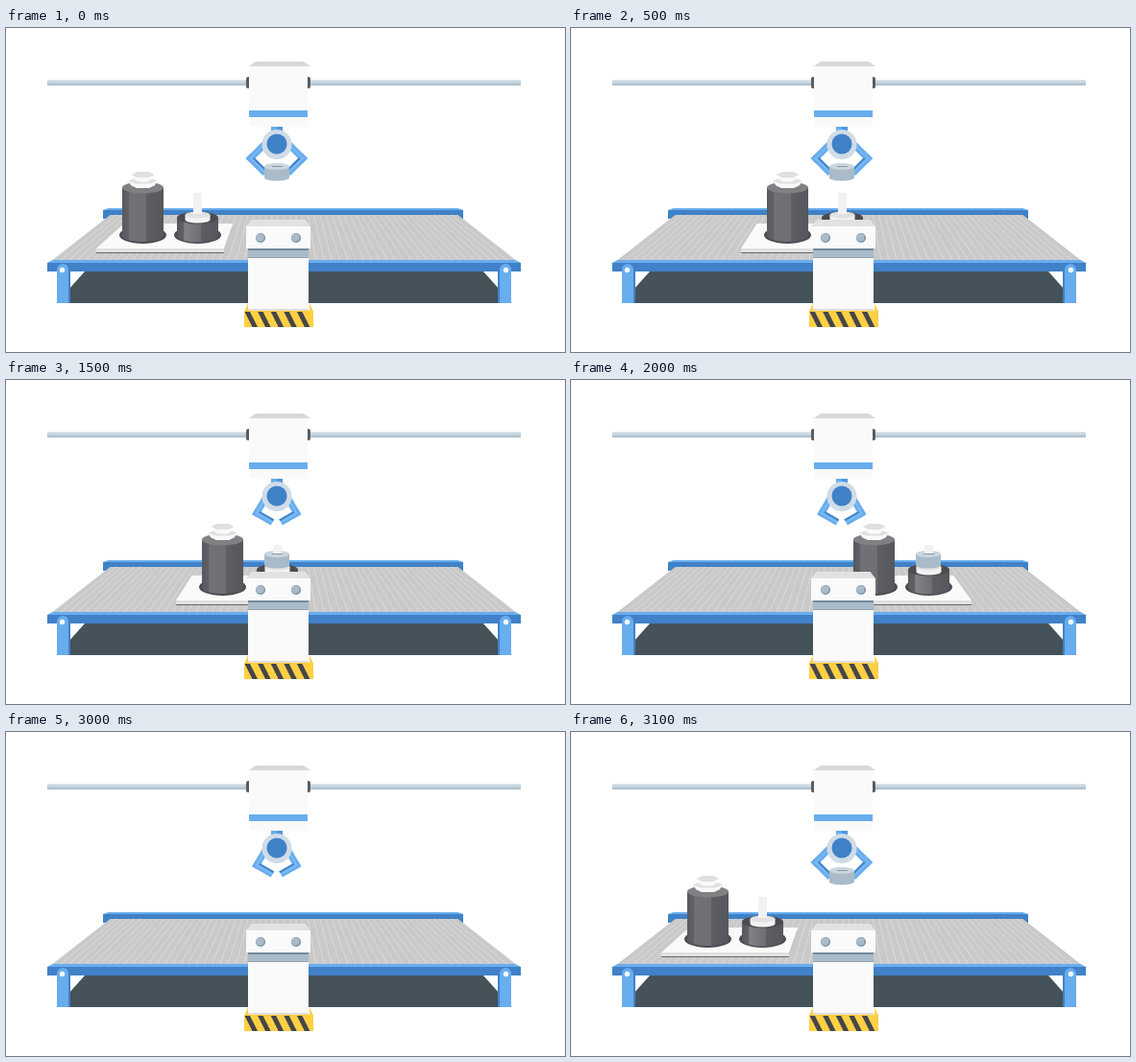
These frames come from a looping animation (582 by 338 pixels, 3.2 s). An HTML page with a canvas:

```html
<!DOCTYPE html>
<html lang="en">
<head>
<meta charset="utf-8">
<title>Assembly line</title>
<style>
html, body { margin: 0; width: 100%; height: 100%; overflow: hidden; background: #fff; }
canvas { display: block; width: 582px; height: 338px; }
</style>
</head>
<body>
<canvas id="stage" width="582" height="338"></canvas>
<script>
const ctx = document.getElementById('stage').getContext('2d');
const BLUE = '#68adee', DEEP = '#4081c7', WHITE = '#fafafa', STEEL = '#a9bbc9', DARK = '#4b4c51';
const YELLOW = '#ffd044', KNOB = '#5b5c60';
const AXIS = 289.5;      // centre line of the belt
const LOOP = 3200, BEAT = 500, RESET = 3100;
const STOPS = [0, 83, 83, 83, 190, 260];  // pallet position on each beat

function rect(color, x, y, w, h) {
  ctx.fillStyle = color;
  ctx.fillRect(x, y, w, h);
}

function shape(color, points) {
  ctx.beginPath();
  for (const [x, y] of points) ctx.lineTo(x, y);
  ctx.closePath();
  ctx.fillStyle = color;
  ctx.fill();
}

// Symmetric trapezoid, given by its half widths at the top and bottom.
function trapezoid(color, x, top, halfTop, bottom, halfBottom) {
  shape(color, [[x - halfTop, top], [x + halfTop, top], [x + halfBottom, bottom], [x - halfBottom, bottom]]);
}

function oval(color, x, y, rx, ry = rx) {
  ctx.beginPath();
  ctx.ellipse(x, y, rx, ry, 0, 0, Math.PI * 2);
  ctx.fillStyle = color;
  ctx.fill();
}

function rounded(color, x, y, w, h, radii) {
  ctx.beginPath();
  ctx.roundRect(x, y, w, h, radii);
  ctx.fillStyle = color;
  ctx.fill();
}

function hexagon(color, x, y, rx, ry) {
  shape(color, Array.from({ length: 6 }, (_, i) => {
    const a = i * Math.PI / 3;
    return [x + rx * Math.cos(a), y + ry * Math.sin(a)];
  }));
}

function nut(x, y, rx, height) {
  for (let d = height; d > 0; d -= .5) hexagon(WHITE, x, y + d, rx - d * .6, 3.4);
  hexagon('#e0e0e0', x, y, rx, 3.4);
}

function cylinder(side, lid, x, top, bottom, rx, ry) {
  ctx.beginPath();
  ctx.moveTo(x - rx, top);
  ctx.ellipse(x, bottom, rx, ry, 0, Math.PI, 0, true);
  ctx.lineTo(x + rx, top);
  ctx.fillStyle = side;
  ctx.fill();
  oval(lid, x, top, rx, ry);
}

function metal(x, rx, shine) {
  const g = ctx.createLinearGradient(x - rx, 0, x + rx, 0);
  g.addColorStop(0, '#58595e');
  g.addColorStop(.16, '#606166');
  g.addColorStop(.18, shine);
  g.addColorStop(.57, '#6e6f73');
  g.addColorStop(.59, '#5d5e63');
  g.addColorStop(1, '#56575c');
  return g;
}

function placed(x, y, draw, angle = 0) {
  ctx.save();
  ctx.translate(x, y);
  ctx.rotate(angle);
  draw();
  ctx.restore();
}

function mirrored(axis, draw) {
  draw();
  ctx.save();
  ctx.translate(2 * axis, 0);
  ctx.scale(-1, 1);
  draw();
  ctx.restore();
}

const beltHalf = y => 181 + (y - 195) * 60 / 47;

// Moves a point along the belt's perspective from one row to another.
const project = (x, from, to) => AXIS + (x - AXIS) * beltHalf(to) / beltHalf(from);

function conveyor() {
  trapezoid('#455259', AXIS, 254, 207.5, 287, 237);
  trapezoid(BLUE, 288.5, 188, 182, 190, 187.5);
  rect(DEEP, 101, 190, 375, 9);
  trapezoid('#c9c9c9', AXIS, 195, beltHalf(195), 242, beltHalf(242));
  ctx.strokeStyle = '#dadada';
  ctx.lineWidth = 1;
  ctx.beginPath();
  for (let x = 57; x < 530; x += 8.3) {
    ctx.moveTo(project(x, 242, 195), 195);
    ctx.lineTo(x, 242);
  }
  ctx.stroke();
  trapezoid(BLUE, AXIS, 242, 241, 245, 246.5);
  rect(DEEP, 43, 245, 493, 9);
  mirrored(AXIS, () => {
    rounded(DEEP, 55, 246, 12, 41, [6, 6, 0, 0]);
    rounded(BLUE, 53, 246, 12, 41, [6, 6, 0, 0]);
    oval(WHITE, 58.5, 252.5, 2.7);
  });
}

function pallet(shift) {
  const left = 94 + shift, right = 227 + shift;
  const slab = (color, dy) => shape(color, [
    [project(left, 230, 204), 204 + dy], [project(right, 230, 204), 204 + dy],
    [right, 230 + dy], [left, 230 + dy]
  ]);
  slab('#c4c4c4', 4);
  slab(WHITE, 0);
  rect('#e1e1e1', left, 230, right - left, 4);
  rect('#66676a', left, 234, right - left, 1);
}

function pillar(x) {
  oval(DARK, x, 216, 24.5, 9);
  cylinder(metal(x, 21.5, '#717277'), '#808184', x, 166.5, 217, 21.5, 6);
  nut(x, 159.5, 15.5, 4.5);
  nut(x, 153, 12, 4.5);
}

function ring(x, top) {
  cylinder(STEEL, '#cbd5dd', x, top + 3.5, top + 15, 13, 3.5);
  rect('#8799a6', x - 5, top + 3, 11, 1);
}

function motor(x, fitted) {
  oval(DARK, x, 216, 24.5, 9);
  cylinder(metal(x, 21.5, '#828386'), DARK, x, 198, 217, 21.5, 6.5);
  cylinder('#f2f2f2', '#e1e1e1', x, 195, 200, 13, 3.5);
  if (fitted) ring(x - .5, 178);
  rect('#f2f2f2', x - 4.5, 172, 9, fitted ? 9 : 22);
}

function load({ shift, fitted }) {
  if (shift === undefined) return;
  // Past the pedestal the parts are seen from their other side.
  const lean = shift > 100 ? -17 : 0;
  pallet(shift);
  pillar(142.5 + shift + lean);
  motor(199.5 + shift + lean, fitted);
}

function pedestal() {
  const x = 283.5;
  rect(WHITE, 252, 207, 63, 87);
  trapezoid('#e2e2e2', x, 200, 28, 207, 33.5);
  rect(WHITE, 250, 207, 67, 23);
  for (const side of [-18.5, 18.5]) {
    oval('#788d9d', x + side, 219, 5);
    oval(STEEL, x + side - .5, 218.5, 4.3);
  }
  rect(STEEL, 252, 230, 63, 10);
  rect('#748a9b', 252, 230, 63, 2);
  rect('#8fa3b2', 252, 239, 63, 1);
  mirrored(284, () => shape(YELLOW, [[252, 287], [252, 296], [248, 296]]));
  rect(WHITE, 252, 287, 63, 6);
  rect('#e4ddd0', 252, 293, 63, 2);
  rect(YELLOW, 248, 295, 72, 17);
  ctx.save();
  ctx.beginPath();
  ctx.rect(248, 296, 72, 16);
  ctx.clip();
  for (let s = 248.5; s < 316; s += 13.6) {
    shape('#45464a', [[s, 296], [s + 5.5, 296], [s + 13.5, 312], [s + 8, 312]]);
  }
  ctx.restore();
}

// Right-angled arm, drawn from its elbow.
function arm(length) {
  rect(BLUE, -3.5, -length, 7, length + 3.5);
  rect(BLUE, -3.5, -3.5, length + 3.5, 7);
  rect(DEEP, 2, -3.5, length - 2, 1.8);
  rect('#8bc0f3', -.5, -length, 1, length);
  rect('#8bc0f3', -.5, -.5, length, 1);
}

function gripper({ drop, grip, fitted }) {
  rect(BLUE, 276, 103, 12, 6 + drop);
  rect('#4f96de', 282, 103, 6, 6 + drop);
  placed(0, drop, () => {
    mirrored(281.8, () => grip
      ? placed(254.5, 136, () => arm(22), Math.PI / 4)
      : placed(261, 139, () => arm(19), Math.PI / 6));
    if (grip && !fitted) ring(282, 141);
    oval('#d0dce6', 282, 121.5, 15.5);
    oval(DEEP, 282, 121, 10.5);
  });
}

function carriage() {
  const rail = ctx.createLinearGradient(0, 54, 0, 60);
  rail.addColorStop(0, '#dce6ee');
  rail.addColorStop(1, '#a9bbc9');
  rect(rail, 43, 54, 493, 6);
  for (const x of [250, 311]) rounded(KNOB, x, 51, 6, 12, 2);
  trapezoid('#d8d8d8', 285, 35, 25, 40, 32);
  rect(WHITE, 253, 40, 61, 63);
  rect(BLUE, 253, 86, 61, 7);
}

function stateAt(time) {
  const beat = time >= RESET ? 0 : Math.floor(time / BEAT);
  return {
    shift: STOPS[beat],
    drop: beat === 2 ? 37 : 0,
    grip: beat < 3,
    fitted: beat >= 2
  };
}

function draw(now) {
  const state = stateAt(now % LOOP);
  rect('#fff', 0, 0, 582, 338);
  conveyor();
  // A lowered ring sits on the shaft, in front of the arms.
  const layers = state.drop ? [gripper, load] : [load, gripper];
  layers.forEach(layer => layer(state));
  carriage();
  pedestal();
}

const start = performance.now();
function tick() {
  draw(performance.now() - start);
  requestAnimationFrame(tick);
}
tick();
</script>
</body>
</html>
```
